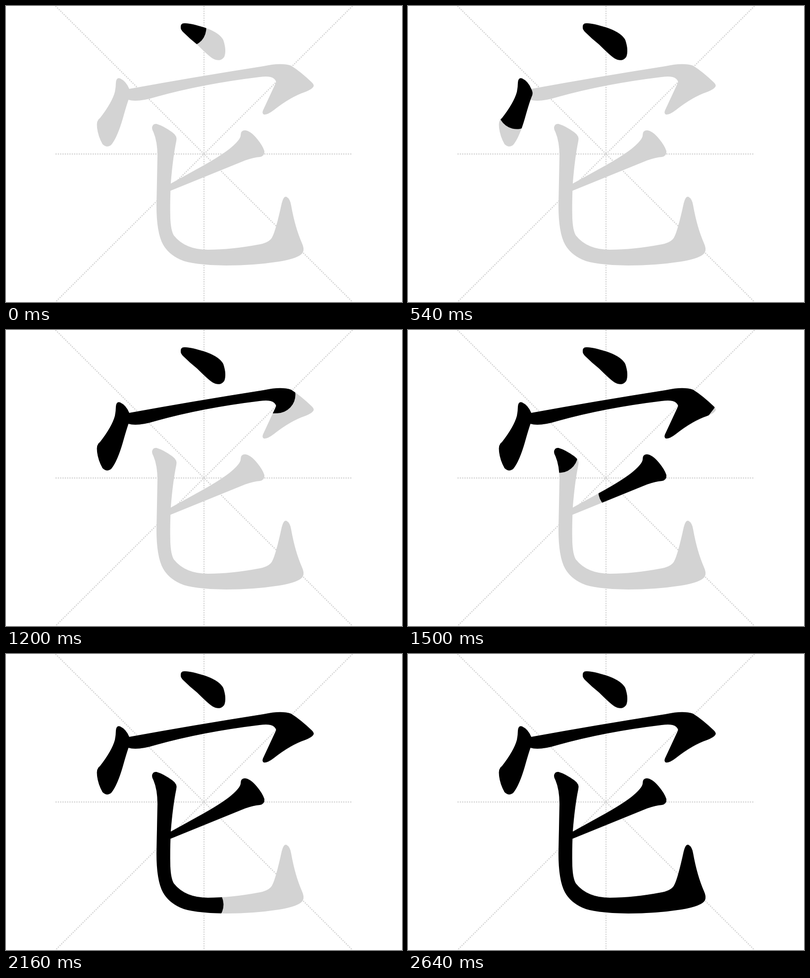
Write an HTML page with a canvas that moves like this. It is 800 px wide and 600 px high and loops after 2700 ms.

```html
<!DOCTYPE html>
<html lang="zh">
<head>
<meta charset="utf-8">
<title>Stroke order</title>
<style>
html, body { margin: 0; width: 100%; height: 100%; overflow: hidden; background: #fff; }
canvas { display: block; }
</style>
</head>
<body>
<canvas id="stage" width="800" height="600"></canvas>
<script>
const ctx = document.getElementById('stage').getContext('2d');
const LOOP = 2700, STEP = 60, BRUSH = 75, UNIT = 600 / 256;
const GRAY = '#d3d3d3', INK = '#000';

// start and full are in ms, speed in px per ms; spine is the brush path
const strokes = [
  {
    start: 0, speed: 0.16, full: 900,
    spine: [[367, 45], [410, 70], [429, 97]],
    outline: 'M353 44Q352 34 362 35Q375 35 405 45Q432 55 439 69Q446 90 441 103Q433 115 417 106Q409 101 386 78Q372 67 358 53Q353 48 353 44Z'
  },
  {
    start: 350, speed: 0.28, full: 900,
    spine: [[231, 160], [220, 212], [206, 268]],
    outline: 'M222 155Q223 144 231 147Q243 153 249 168Q253 175 251 181Q246 192 236 228Q225 266 213 281Q204 289 195 280Q186 264 184 247Q182 232 190 227Q214 196 220 174Q222 164 222 155Z'
  },
  {
    start: 545, speed: 0.44, full: 1900,
    spine: [[263, 178], [443, 146], [520, 132], [558, 131], [588, 137], [532, 209]],
    outline: 'M240 170L249 168Q380 144 520 122Q556 114 576 121Q595 133 618 155Q624 161 620 165Q617 169 605 174Q575 184 541 211Q528 221 521 220Q517 218 519 212L545 156Q547 152 541 147Q534 141 512 144Q397 158 304 184Q265 196 247 190L240 186Z'
  },
  {
    start: 1280, speed: 0.44, full: 1740,
    spine: [[490, 270], [488, 292], [422, 327], [333, 367]],
    outline: 'M474 263Q474 252 482 252Q493 252 507 269Q518 282 522 294Q523 304 513 306Q500 307 483 313L331 375L331 361L385 331Q429 307 451 290Q473 272 474 263Z'
  },
  {
    start: 1499, speed: 0.47, full: 2640,
    spine: [[305.5, 251.5], [321, 282], [318, 360], [318, 430], [330, 474], [358, 500], [401.5, 508], [500, 505], [566, 492], [566, 405]],
    outline: 'M295 247Q296 238 304 239Q318 243 336 256Q347 264 344 274Q337 308 333 358Q331 400 332 430Q333 455 339 465Q362 494 408 494Q455 494 513 483Q533 479 538 468Q545 455 557 400Q561 384 567 387Q574 391 576 404Q584 449 598 481Q603 492 600 499Q594 511 552 518Q500 526 445 526Q375 525 352 514Q328 503 317 483Q304 459 304 404L306 304Q306 275 298 256Q295 251 295 247Z'
  }
].map(s => ({ ...s, shape: new Path2D(s.outline) }));

function drawGrid() {
  ctx.strokeStyle = GRAY;
  ctx.lineWidth = UNIT;
  ctx.lineCap = 'butt';
  ctx.setLineDash([UNIT, UNIT]);
  for (const [x1, y1, x2, y2] of [[100, 0, 700, 600], [700, 0, 100, 600], [400, 0, 400, 600], [100, 300, 700, 300]]) {
    ctx.beginPath();
    ctx.moveTo(x1, y1);
    ctx.lineTo(x2, y2);
    ctx.stroke();
  }
  ctx.setLineDash([]);
}

function traceSpine(points, distance) {
  ctx.beginPath();
  ctx.moveTo(...points[0]);
  for (let i = 1; i < points.length && distance > 0; i++) {
    const [x, y] = points[i - 1];
    const dx = points[i][0] - x, dy = points[i][1] - y;
    const length = Math.hypot(dx, dy);
    const part = Math.min(1, distance / length);
    ctx.lineTo(x + dx * part, y + dy * part);
    distance -= length;
  }
}

function inkStroke({ start, speed, full, spine, shape }, time) {
  if (time < start) return;
  ctx.fillStyle = INK;
  if (time >= full) {
    ctx.fill(shape);
    return;
  }
  ctx.save();
  ctx.clip(shape);
  ctx.strokeStyle = INK;
  ctx.lineWidth = BRUSH;
  ctx.lineCap = ctx.lineJoin = 'round';
  traceSpine(spine, (time - start) * speed + 0.05);
  ctx.stroke();
  ctx.restore();
}

function draw(time) {
  ctx.fillStyle = '#fff';
  ctx.fillRect(0, 0, 800, 600);
  drawGrid();
  ctx.fillStyle = GRAY;
  for (const s of strokes) ctx.fill(s.shape);
  for (const s of strokes) inkStroke(s, time);
}

let origin = null;
function tick(now) {
  origin ??= now;
  const time = Math.max(0, now - origin) % LOOP;
  draw(Math.floor(time / STEP) * STEP);
  requestAnimationFrame(tick);
}
draw(0);
requestAnimationFrame(tick);
</script>
</body>
</html>
```
